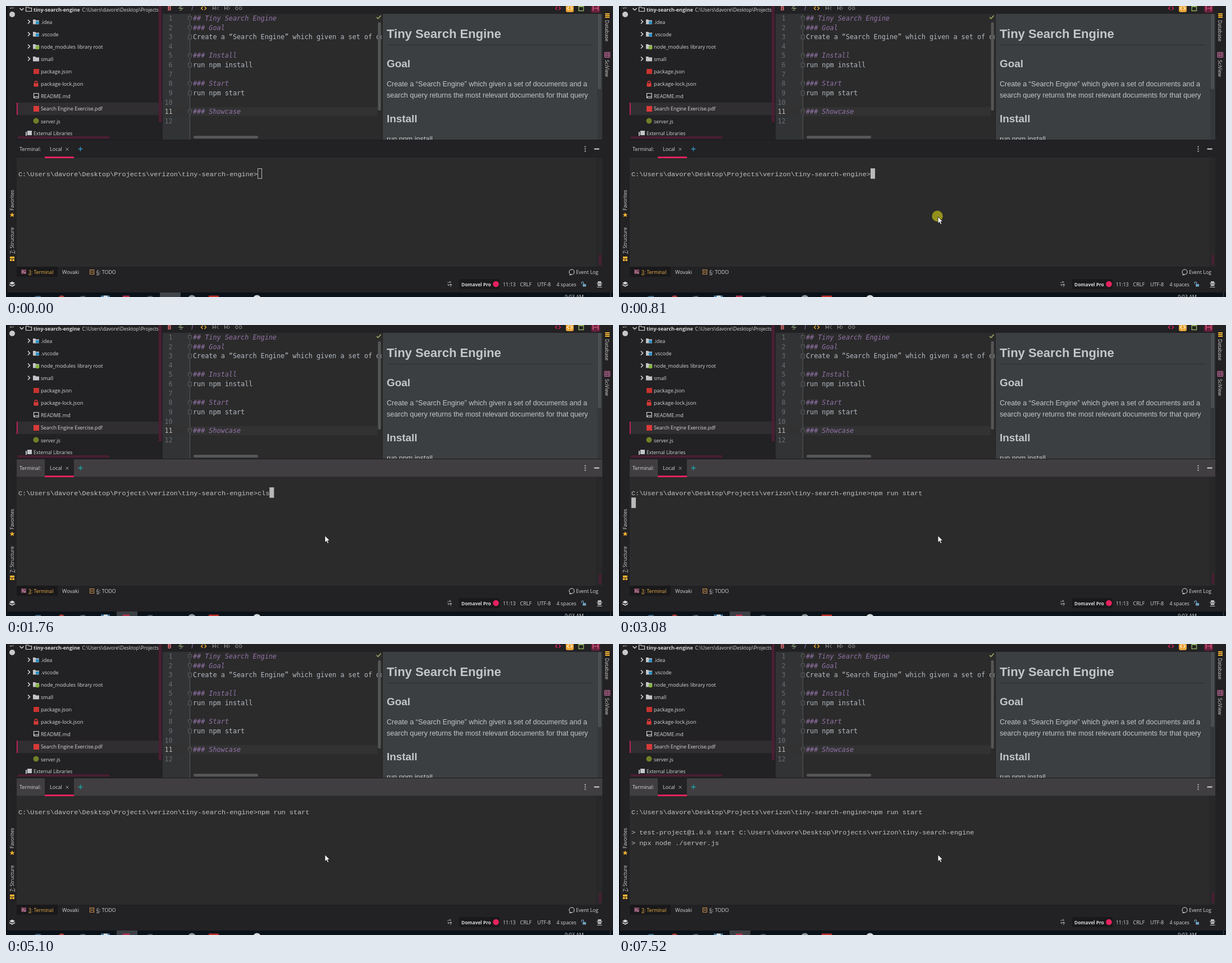
These frames come from a looping animation (1081x518 px, 8 s). An HTML page:

```html
<!DOCTYPE html>
<html lang="en">
<head>
<meta charset="utf-8">
<title>Terminal session</title>
<style>
html, body { margin: 0; width: 100%; height: 100%; overflow: hidden; background: #222123; }
svg { display: block; width: 100vw; height: 100vh; }
text { white-space: pre; font-family: "Open Sans", "Noto Sans", sans-serif; }
.mono { font-family: "DejaVu Sans Mono", monospace; }
.shell { font-family: "Liberation Mono", monospace; }
.page { font-family: "Liberation Sans", Arial, sans-serif; }
</style>
</head>
<body>
<svg id="stage" viewBox="0 0 1081 518" preserveAspectRatio="none">
  <defs>
    <clipPath id="treeClip"><path d="M0 0H278V238H0z"/></clipPath>
    <clipPath id="editClip"><path d="M279 0H669V238H279z"/></clipPath>
    <clipPath id="pageClip"><path d="M671 14H1062V238H671z"/></clipPath>
  </defs>
  <g id="back"></g>
  <g id="tree" clip-path="url(#treeClip)"></g>
  <g id="edit" clip-path="url(#editClip)"></g>
  <g id="page" clip-path="url(#pageClip)"></g>
  <g id="tools"></g>
  <g id="term"></g>
  <g id="bars"></g>
  <g id="mouse">
    <circle id="click" r="9.7" fill="#93911c"/>
    <path d="M1 1V13.2L3.8 10.6L5.7 15L7.8 14.1L5.9 9.8H9.7z" fill="#fff" stroke="#111" stroke-width=".8"/>
  </g>
</svg>
<script>
const $ = id => document.getElementById(id);
const pink = '#e8215f', maroon = '#4b1e33', white = '#d6d6d6', gold = '#f5b431', gray = '#9a9a9a';
const CELL = 7.1, ROW = 18.2;
const esc = s => s.replace(/&/g, '&amp;').replace(/</g, '&lt;').replace(/>/g, '&gt;');
const add = (id, ...parts) => { $(id).innerHTML += parts.join(''); };
const box = (x, y, w, h, fill, more = '') =>
  `<rect x="${x}" y="${y}" width="${w}" height="${h}" fill="${fill}" ${more}/>`;
const dot = (x, y, r, fill, more = '') => `<circle cx="${x}" cy="${y}" r="${r}" fill="${fill}" ${more}/>`;
const line = (d, color, w = 1) => `<path d="${d}" fill="none" stroke="${color}" stroke-width="${w}"/>`;
const shape = (d, fill) => `<path d="${d}" fill="${fill}"/>`;
const text = (x, y, s, fill = white, size = 9, more = '') =>
  `<text x="${x}" y="${y}" fill="${fill}" font-size="${size}" ${more}>${esc(s)}</text>`;
const code = (x, y, s, fill, more = '') => text(x, y, s, fill, 11.79, 'class="mono" ' + more);
const shell = (x, y, s, more = '') => text(x, y, s, '#c4c4c4', 11.83, 'class="shell" ' + more);
const bold = 'font-weight="700"';
const turned = (x, y, deg, s) => text(0, 0, s, white, 8.7, `transform="translate(${x} ${y}) rotate(${deg})"`);

// Panels
add('back',
  box(0, 0, 1081, 518, '#222123'),
  box(0, 0, 2, 510, '#08080a'),
  box(279, 14, 391, 224, '#2b2b2b'),
  box(279, 14, 48, 224, '#313335'),
  box(279, 180, 383, 16, '#323233'),
  box(671, 14, 391, 224, '#3c3f41'),
  box(1053, 14, 9, 224, '#35383a'),
  box(19, 270, 1032, 194, '#2b2b2b'),
  box(1051, 270, 11, 194, '#282829'));

// Project tree
const folder = (y, badge = '') =>
  line(`M39 ${y - 3.5}L42.5 ${y}L39 ${y + 3.5}`, white, 1.5) +
  shape(`M48 ${y - 4}h4l1.5 1.5H59v7H48z`, '#c3c5c8') + badge;
const lock = (x, y, fill) => box(x - 4, y - 1, 8, 6, fill) +
  line(`M${x - 2.3} ${y}v-2.5a2.3 2.3 0 0 1 4.6 0v2.5`, fill, 1.4);
add('tree',
  box(19, 172, 259, 22, '#312e32'), box(19, 172, 1.5, 22, pink),
  line('M24.5 4L28 7.5L31.5 4', white, 1.5),
  line('M35.5 2h4l1 1.5h5v6h-10z', white, 1.2),
  text(49, 9.5, 'tiny-search-engine', white, 8.95, bold),
  text(135.5, 9.5, 'C:\\Users\\davore\\Desktop\\Projects', white, 8.65),
  folder(28, box(53, 27, 6, 5, '#2c8fc4')), text(62, 31.5, '.idea'),
  folder(50, box(53, 49, 6, 5, '#2c8fc4')), text(62, 53.5, '.vscode'),
  folder(72, dot(56, 74, 3.5, '#86b53c')), text(62, 75.5, 'node_modules'),
  text(127, 75.5, 'library root', white, 8.8),
  folder(94), text(62, 97.5, 'small'),
  box(49, 112, 10, 9, '#c73330'), text(62, 120, 'package.json', white, 9.1),
  lock(53.5, 138.5, '#d83a38'), text(62, 142, 'package-lock.json', white, 9.2),
  line('M49.5 164V155.5h8.5v8.5H51a1.5 1.5 0 0 1 0-2.5H58', white, 1.2),
  text(62, 164, 'README.md', white, 9.1),
  box(49, 178, 10, 10, '#d83a38'), text(62, 186, 'Search Engine Exercise.pdf', white, 8.85),
  dot(53.5, 204.5, 5, '#6f8028'), text(62, 208.5, 'server.js', white, 8.9),
  shape('M35 224h2v7h-2zM38 222h8v8h-8z', '#c3c5c8'), text(49, 230, 'External Libraries', white, 8.55),
  box(272, 0, 5, 207, maroon), box(21, 232, 163, 4, maroon));

// Editor
const source = ['## Tiny Search Engine', '### Goal',
  'Create a “Search Engine” which given a set of documents and a', '',
  '### Install', 'run npm install', '', '### Start', 'run npm start', '', '### Showcase', ''];
add('edit', line('M327.5 14V238', '#555759'));
source.forEach((s, i) => {
  const y = 26 + i * 16.62, m = y - 4, head = s[0] === '#';
  add('edit', code(i < 9 ? 289.5 : 282.5, y, `${i + 1}`, i === 10 ? '#b4b4b4' : '#686c70'));
  if (!s) return;
  add('edit',
    `<path d="M324.5 ${m - 3.5}h6v${head ? 5 : 7}${head ? 'l-3 3l-3 -3' : 'h-6'}z" fill="#2b2b2b" stroke="#606264"/>`,
    line(`M326 ${m}h3`, '#606264'),
    code(333, y, s, head ? '#9373a8' : '#b3bac2', head ? 'font-style="italic"' : ''));
});
add('edit',
  line('M660 20l2.5 2.5l5-5.5', '#a9b665', 1.5),
  box(662.5, 29, 5, 157, '#555657', 'rx="2"'),
  box(334, 231, 115, 5, '#555657', 'rx="2"'));

// Preview
const para = (y, s, size = 12.6, more = '') => text(678, y, s, '#c4c6c8', size, 'class="page" ' + more);
add('page',
  para(57, 'Tiny Search Engine', 22, bold),
  line('M678 69.5H1045', '#2d3032'),
  para(109, 'Goal', 18.9, bold),
  para(143, 'Create a “Search Engine” which given a set of documents and a'),
  para(163, 'search query returns the most relevant documents for that query'),
  para(207, 'Install', 18.9, bold),
  para(241, 'run npm install'),
  box(1054, 14, 6, 134, '#4b4e50', 'rx="2"'));

// Toolbars around the editor
const angles = (x, y, c) => line(`M${x - 1.5} ${y - 3}l-3 3l3 3M${x + 1.5} ${y - 3}l3 3l-3 3`, c, 1.3);
add('tools',
  text(287.5, 7.5, 'B', '#e06c75', 10.5, bold),
  text(308.5, 7.5, 'S', '#9fb98a', 10), line('M307 4H316', '#9fb98a'),
  text(330, 7.5, 'I', '#b07fd0', 10.5, 'font-style="italic"'),
  angles(352, 4, gold),
  line('M368.5 0V7M373 0V7M368.5 4h4.5M378.5 1l-3 3l3 3', gray),
  line('M389.5 0V7M394 0V7M389.5 4h4.5M395.5 1l3 3l-3 3', gray),
  line('M413 1.5h-2a2.5 2.5 0 0 0 0 5h2M415.5 1.5h2a2.5 2.5 0 0 1 0 5h-2M411.5 4h5.5', gray),
  angles(983, 4, pink),
  box(997, -3, 14, 14, '#eaa63a', 'rx="3"'), angles(1004, 4, '#fff3d6'),
  line('M1020 0V8.5H1028.5V0', '#8fae5c', 1.4), box(1020, -1, 9, 3, '#8fae5c'),
  box(1042, -4, 16, 16, '#67203c', 'rx="3"'),
  line('M1045.5 0V8.5M1054.5 0V8.5M1047 4h6.5', '#ff6d94', 1.2),
  // right strip
  [13, 16, 19].map(y => shape(`M1067 ${y}h8v2h-8z`, gold)).join(''),
  turned(1067, 25, 90, 'Database'),
  line('M1066 82.5h9.5v9h-9.5zM1066 85.5h9.5M1066 88.5h9.5M1069 82v9.5M1072.5 82v9.5', '#c76b9c'),
  turned(1067, 96, 90, 'SciView'),
  // left strip
  turned(14, 6, -90, '1:'),
  dot(11, 15, 5, '#c9c9c9'),
  turned(14, 364, -90, 'Favorites'),
  shape('M11 367.5l1.3 3h3.2l-2.5 2l1 3.2l-3-1.9l-3 1.9l1-3.2l-2.5-2h3.2z', gold),
  turned(14, 441, -90, '7: Structure'), line('M15.5 435.5V441', white, .8),
  box(7, 446, 8, 3.5, gold), box(7, 450.5, 3.5, 3.5, gold), box(11.5, 450.5, 3.5, 3.5, gold),
  shape('M11 490.5l5 2.7l-5 2.7l-5-2.7z', white),
  line('M6 496l5 2.7l5-2.7', white, 1.7));

// Terminal
const path = 'C:\\Users\\davore\\Desktop\\Projects\\verizon\\tiny-search-engine';
const row = (i, s) => shell(22, 303 + i * ROW, s);
add('term',
  box(19, 238, 1043, 1, '#1b1a1c'),
  box(19, 239, 1043, 31, '#403e41', 'id="head"'),
  box(69, 239, 52, 31, '#232224'),
  box(69, 268, 52, 3, pink),
  text(24, 258, 'Terminal:', white, 8.9), text(78, 258, 'Local', white, 9.1),
  line('M106.5 252.5l5 5M111.5 252.5l-5 5', gray),
  '<path id="plus" d="M128.5 254.5h8M132.5 250.5v8" stroke-width="1.4"/>',
  [250.5, 254.5, 258.5].map(y => dot(1031.5, y, 1.1, white)).join(''),
  box(1047.5, 253.5, 9, 2, white),
  row(0, path + '>'),
  shell(22 + 60 * CELL, 303, '', 'id="typed"'),
  '<g id="output">', row(2, '> test-project@1.0.0 start ' + path), row(3, '> npx node ./server.js'), '</g>',
  '<rect id="caret" width="7" height="17.5" stroke="#b9b9b9"/>',
  box(1056, 443, 4, 18, maroon));

// Tool window bar, status bar and taskbar
add('bars',
  box(19, 464, 73, 18, '#19181a'),
  box(27, 469, 9, 8, '#7d4960'), line('M29 471l2 2l-2 2M32 475h3', '#e3c1cf', .9),
  text(40, 477, '3: Terminal', '#f0b54a', 8.6), line('M40 478.5h5', '#f0b54a', .8),
  text(100, 477, 'Wovaki', white, 9),
  line('M149.5 469.5h7v8h-7z', '#c08a4a', 1.2), line('M151 472h4M151 474.5h4', '#c08a4a'),
  text(161, 477, '6: TODO', white, 8.9), line('M161 478.5h5', white, .8),
  dot(1007.5, 473.5, 4.5, 'none', `stroke="${white}" stroke-width="1.1"`),
  line('M1003 478.5h4', white, 1.1),
  text(1015, 477, 'Event Log', white, 8.85),
  line('M786 492h6l-2-2M793 496h-6l2 2', gray, 1.2), text(790.5, 500, '?', white, 7, bold),
  box(807, 486, 72, 18, '#19181a'),
  text(811, 498.5, 'Domavel Pro', white, 8.3, bold),
  dot(872.5, 495, 5.3, pink),
  text(885, 498.5, '11:13', white, 8.9), text(915.5, 498.5, 'CRLF', white, 9),
  text(946, 498.5, 'UTF-8', white, 9), text(980.5, 498.5, '4 spaces', white, 8.8),
  box(1027, 495, 6, 4.5, '#6fa0bd'), line('M1025 495v-2a1.8 1.8 0 0 1 3.6 0v2', '#6fa0bd', 1.2),
  shape('M1054 490h6v3h2v1.2h-10v-1.2h2zM1053.5 495h7v2l-1 1.5h-5l-1-1.5zM1052.5 500h9v1h-9z', '#b9b9b9'),
  box(0, 510, 1081, 8, '#0b1219'),
  box(274, 510, 37, 8, '#41464a', 'id="hover"'),
  box(197, 510, 37, 8, '#3b3f44', 'id="active"'),
  shape('M50 518l4-2h8v2z', '#38617c'),
  dot(99, 521, 6, '#a83a37'), shape('M130 518l5-2h6v2z', '#4b5a62'),
  box(169, 515.5, 16, 3, '#4a83ad'), box(174, 515.5, 7, 3, '#d5dde2'),
  box(208, 515.5, 12, 3, '#b8324e'), shape('M250 518l5-2h6v2z', '#44515a'),
  dot(331, 521.5, 7, '#8c9498'), box(361, 515.5, 18, 3, '#c4302b'),
  dot(447, 521.5, 7, '#d5d8da'),
  text(995, 520.5, '9:03 AM', white, 9),
  line('M1076.5 510V518', '#3d454b'));

// Caret cues: time, column, row; no column means blinked off
const cues = [[0, 60, 0], [1760, 63, 0], [2230, 73, 0], [2780], [3080, 0, 1], [4090], [4630, 0, 1],
  [5100], [5650, 0, 1], [6120], [6510, 0, 5], [7520]];
const set = (id, o) => { for (const k in o) $(id).setAttribute(k, o[k]); };
const show = (id, on) => set(id, { visibility: on ? 'visible' : 'hidden' });

function draw(t) {
  const focus = t >= 810, lit = t >= 920;
  show('head', lit);
  show('active', lit);
  show('hover', t < 360);
  set('plus', { stroke: lit ? '#1ea5a5' : '#3592c4' });

  const [, col, r] = cues.filter(c => c[0] <= t).pop();
  show('caret', col !== undefined);
  if (col !== undefined) set('caret', {
    x: 22.5 + col * CELL, y: 289.5 + r * ROW, fill: focus ? '#b9b9b9' : 'none'
  });
  $('typed').textContent = t < 1760 ? '' : t < 2230 ? 'cls' : 'npm run start';
  show('output', t >= 6510);

  // The pointer glides up from the taskbar in 70 ms steps
  const p = Math.min(1, Math.max(0, Math.floor((t - 290) / 70 + 1) * 70 / 490));
  const e = 1 - (1 - p) ** 2;
  set('mouse', { transform: `translate(${292 + 275 * e} ${540 - 166 * e})` });
  const out = t >= 290;
  show('mouse', out);
  show('click', out && focus && t < 990);
}
function tick() {
  draw(performance.now() % 8000);
  requestAnimationFrame(tick);
}
tick();
</script>
</body>
</html>
```
